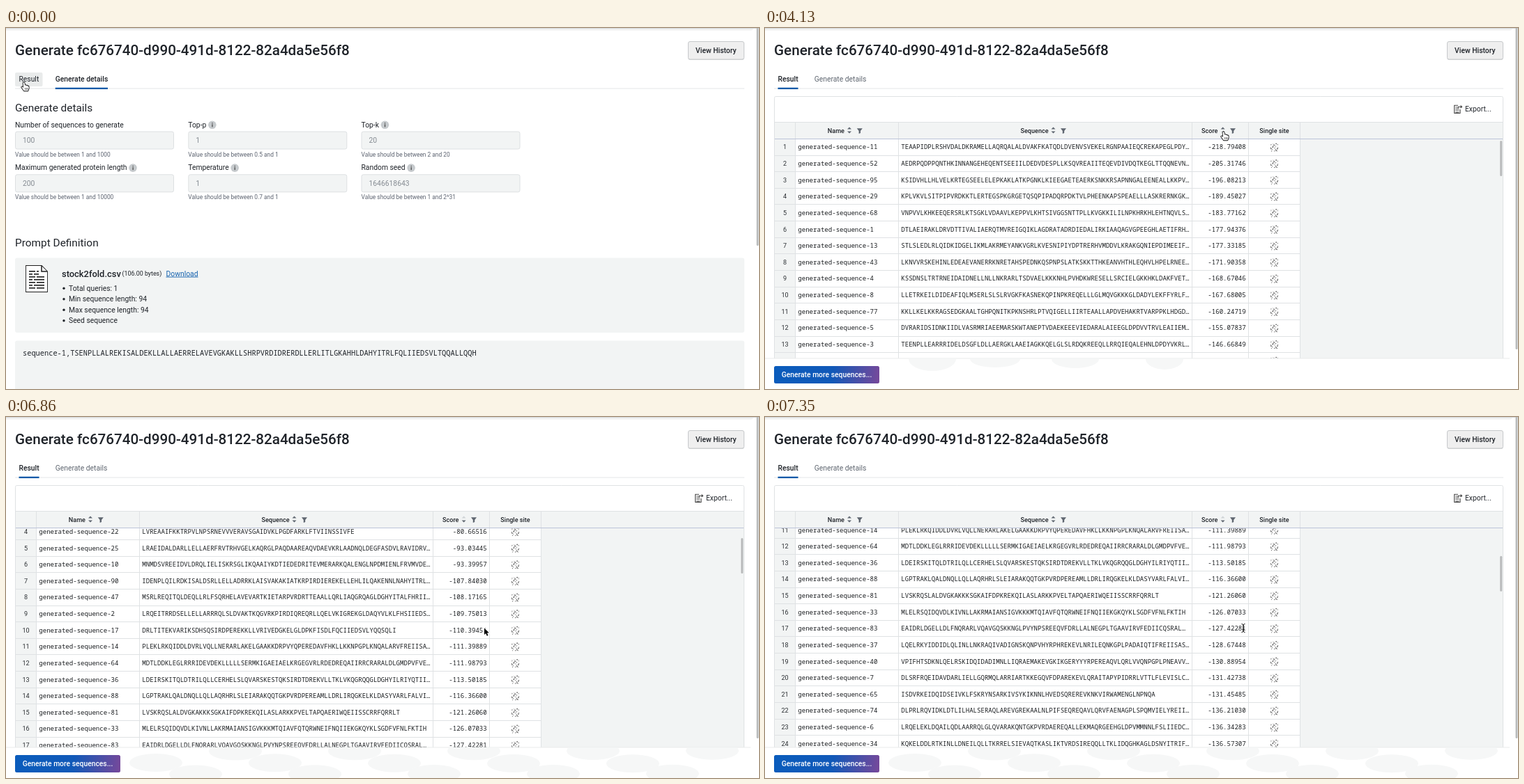
An HTML page with a canvas that plays this animation: 1080 px wide and 519 px high, repeating every 8 s.

```html
<!DOCTYPE html>
<html lang="en">
<head>
<meta charset="utf-8">
<title>Generated sequences</title>
<style>
html, body { margin: 0; width: 100%; height: 100%; overflow: hidden; background: #fff; }
canvas { display: block; width: 1080px; height: 519px; }
</style>
</head>
<body>
<canvas id="stage" width="1080" height="519"></canvas>
<script>
const ctx = document.getElementById('stage').getContext('2d');
const LOOP = 8000, STEP = 70, ROW = 23.63;
const SANS = 'Roboto, "Noto Sans", sans-serif';
const MONO = '"Roboto Mono", "Noto Sans Mono", "DejaVu Sans Mono", monospace';
const INK = '#1f2329', PALE = '#f2f4f4', LINE = '#dfe2e4', BLUE = '#0f5aa8';

// id, score, sequence
const DATA = `1 -177.94376 DTLAEIRAKLDRVDTTIVALIAERQTMVREIGQIKLAGDRATADRDIEDALIRKIAAQAGVGPEEGHLAETIFRH…
2 -109.75013 LRQEITRRDSELLELLARRRQLSLDVAKTKQGVRKPIRDIQREQRLLQELVKIGREKGLDAQYVLKLFHSIIEDS…
3 -146.66849 TEENPLLEARRRIDELDSGFLDLLAERGKLAAEIAGKKQELGLSLRDQKREEQLLRRQIEQALEHNLDPDYVKRL…
4 -168.67046 KSSDNSLTRTRNEIDAIDNELLNLLNKRARLTSDVAELKKKNHLPVHDKWRESELLSRCIELGKKHKLDAKFVET…
5 -155.07837 DVRARIDSIDNKIIDLVASRMRIAEEMARSKWTANEPTVDAEKEEEVIEDARALAIEEGLDPDVVTRVLEAIIEM…
6 -136.34283 LRQELEKLDQAILQDLAARRQLGLQVARAKQNTGKPVRDAEREQALLEKMAQRGEEHGLDPVMMNNLFSLIIEDC…
7 -131.42738 DLSRFRQEIDAVDARLIELLGQRMQLARRIARTKKEGQVFDPAREKEVLQRAITAPYPIDRRLVTTLFLEVISLC…
8 -167.68005 LLETRKEILDIDEAFIQLMSERLSLSLRVGKFKASNEKQPINPKREQELLLGLMQVGKKKGLDADYLEKFFYRLF…
9 -54.33534 KKYRIDGLRKEVDDLDKRILELLGRRMSVVREMAECKRQHGISSFQPHRWREIVETRTEYALAQHLDREFILDML…
10 -93.39957 MNMDSVREEIDVLDRQLIELISKRSGLIKQAAIYKDTIEDEDRITEVMERARKQALENGLNPDMIENLFRVMVDE…
11 -218.79408 TEAAPIDPLRSHVDALDKRAMELLAQRQALALDVAKFKATQDLDVENVSVEKELRGNPAAIEQCREKAPEGLPDY…
12 -138.57103 SKNKLNFLRSKIDNIDQKFLQLLSLRQKLALEIGKNKLKTNSTIFDASREQKLIDKIINLGKEHHLGPSFISLNF
13 -177.33185 STLSLEDLRLQIDKIDGELIKMLAKRMEYANKVGRLKVESNIPIYDPTRERHVMDDVLKRAKGQNIEPDIMEEIF…
14 -111.39889 PLEKLRKQIDDLDVRLVQLLNERARLAKELGAAKKDRPVYQPEREDAVFHKLLKKNPGPLKNQALARVFREIISA…
17 -110.39451 DRLTITEKVARIKSDHSQSIRDPEREKKLLVRIVEDGKELGLDPKFISDLFQCIIEDSVLYQQSQLI
22 -80.66516 LVREAAIFKKTRPVLNPSRNEVVVERAVSGAIDVKLPGDFARKLFTVIINSSIVFE
25 -93.03445 LRAEIDALDARLLELLAERFRVTRHVGELKAQRGLPAQDAAREAQVDAEVKRLAADNQLDEGFASDVLRAVIDRV…
33 -126.07033 MLELRSQIDQVDLKIVNLLAKRMAIANSIGVKKKMTQIAVFQTQRWNEIFNQIIEKGKQYKLSGDFVFNLFKTIH
34 -136.57307 KQKELDDLRTKINLLDNEILQLLTKRRELSIEVAQTKASLIKTVRDSIREQQLLTKLIDQGHKAGLDSNYITRIF…
36 -113.50185 LDEIRSKITQLDTRILQLLCERHELSLQVARSKESTQKSIRDTDREKVLLTKLVKQGRQQGLDGHYILRIYQTII…
37 -128.67448 LQELRKYIDDIDLQLINLLNKRAQIVADIGNSKQNPVHYRPHREKEVLNRILEQNKGPLPADAIQTIFREIISAS…
40 -130.88954 VPIFHTSDKNLQELRSKIDQIDADIMNLLIQRAEMAKEVGKIKGERYYYRPEREAQVLQRLVVQNPGPLPNEAVV…
47 -108.17165 MSRLREQITQLDEQLLRLFSQRHELAVEVARTKIETARPVRDRTTEAALLQRLIAQGRQAGLDGHYITALFHRII…
64 -111.98793 MDTLDDKLEGLRRRIDEVDEKLLLLLSERMKIGAEIAELKRGEGVRLRDEDREQAIIRRCRARALDLGMDPVFVE…
65 -131.45485 ISDVRKEIDQIDSEIVKLFSKRYNSARKIVSYKIKNNLHVEDSQREREVKNKVIRWAMENGLNPNQA
70 -70.11213 DLKEVRRNIDLIDFMILRVLNKRAELALLVGSVKKEITDKKREGEVIERVKRNSFKFHLRPEFIEKLYLEIIRES…
74 -136.21030 DLPRLRQVIDKLDTLILHALSERAQLAREVGREKAALNLPIFSEQREQAVLQRVFAENAGPLSPQMVIELYREII…
75 -15.10172 RKEIDKIDKKIMKLIETRLYHARKLGEYKKKNGIPIIDKKREKEIIRDRVSKSKLSKEFASKLFLLMINESRRVQK
81 -121.26060 LVSKRQSLALDVGKAKKKSGKAIFDPKREKQILASLARKKPVELTAPQAERIWQEIISSCRRFQRRLT
83 -127.42281 EAIDRLDGELLDLFNQRARLVQAVGQSKKNGLPVYNPSREEQVFDRLLALNEGPLTGAAVIRVFEDIICQSRAL…
88 -116.36600 LGPTRAKLQALDNQLLQLLAQRHRLSLEIARAKQQTGKPVRDPEREAMLLDRLIRQGKELKLDASYVARLFALVI…
90 -107.84030 IDENPLQILRDKISALDSRLLELLADRRKLAISVAKAKIATKRPIRDIEREKELLEHLILQAKENNLNAHYITRL…
52 -205.31746
95 -196.08213
29 -189.45027
68 -183.77162
43 -171.90358
77 -160.24719
20 -144.61905`;

let seed = 7;
const rand = () => (seed = (seed * 16807) % 2147483647) / 2147483647;
const randomSeq = () =>
  Array.from({ length: 75 }, () => 'ALERKDIVGQSTNPHLEK'[Math.floor(rand() * 18)]).join('') + '…';

const records = {};
for (const row of DATA.split('\n')) {
  const [id, score, seq] = row.split(' ');
  records[id] = { id, score, seq: seq || randomSeq() };
}
const ORDER = {
  none: [1, 2, 3, 4, 5, 6, 7, 8, 9, 10, 11, 12, 13, 14],
  asc: [11, 52, 95, 29, 68, 1, 13, 43, 4, 8, 77, 5, 3, 20],
  desc: [75, 9, 70, 22, 25, 10, 90, 47, 2, 17, 14, 64, 36, 88, 81, 33, 83, 37, 40, 7, 65, 74, 6, 34]
};

// time, x, y of the pointer hot spot
const PATH = [
  [0, 25.5, 78.5], [280, 28, 76], [1190, 28, 76], [1400, 251.5, 152], [1470, 282, 155],
  [1610, 172, 157], [2030, 172, 157], [2450, 408.5, 185], [2660, 408.5, 185],
  [2870, 648.5, 167], [3220, 648.5, 167], [3290, 657.5, 163.5], [3430, 669, 172],
  [3780, 657.5, 149.5], [5950, 657.5, 149.5], [6160, 686, 303.5]
];
const SCROLL = [[6510, 0], [6580, 4], [6650, 14], [6790, 54], [7070, 147.7], [7210, 201], [7350, 245.2]];

function track(keys, t, i = 1) {
  let a = keys[0];
  for (const b of keys) {
    if (t < b[0]) return a === b ? b[i] : a[i] + (b[i] - a[i]) * (t - a[0]) / (b[0] - a[0]);
    a = b;
  }
  return a[i];
}

// y is the middle of the capitals
function text(s, x, y, size, { weight = 400, color = INK, align = 'left', font = SANS } = {}) {
  ctx.font = `${weight} ${size}px ${font}`;
  ctx.fillStyle = color;
  ctx.textAlign = align;
  ctx.fillText(s, x, y + size * 0.355);
  return ctx.measureText(s).width;
}

function rect(x, y, w, h, fill) {
  ctx.fillStyle = fill;
  ctx.fillRect(x, y, w, h);
}

function box(x, y, w, h, r, fill, stroke) {
  ctx.beginPath();
  ctx.roundRect(x, y, w, h, r);
  if (fill) { ctx.fillStyle = fill; ctx.fill(); }
  if (stroke) { ctx.strokeStyle = stroke; ctx.lineWidth = 1; ctx.stroke(); }
}

function poly(pts, fill, stroke, width = 1, closed = true) {
  ctx.beginPath();
  for (let i = 0; i < pts.length; i += 2) ctx.lineTo(pts[i], pts[i + 1]);
  if (closed) ctx.closePath();
  if (stroke) { ctx.strokeStyle = stroke; ctx.lineWidth = width; ctx.stroke(); }
  if (fill) { ctx.fillStyle = fill; ctx.fill(); }
}

function dot(x, y, r, fill) {
  ctx.beginPath();
  ctx.arc(x, y, r, 0, 7);
  ctx.fillStyle = fill;
  ctx.fill();
}

function at(x, y, draw) {
  ctx.save();
  ctx.translate(x, y);
  draw();
  ctx.restore();
}

function drawTop(t, onResult) {
  box(-10, -10, 1082, 13.5, 4, '#f1f2f2');
  rect(0, 0, 1080, 1, '#d6d8d9');
  text('Generate fc676740-d990-491d-8122-82a4da5e56f8', 13, 32, 20.66, { weight: 500 });
  box(978.5, 20, 80, 26, 2.5, '#d9dbdc');
  box(978.5, 19.5, 80, 25.5, 2.5, '#efefef', '#c6c9cb');
  text('View History', 1018.3, 32.3, 10.33, { weight: 500, align: 'center' });

  rect(13, 86.5, 1046, 1, '#e3e6e8');
  if (t < 1470) box(13, 64, 39.5, 20, 2, t < 490 ? '#e9ebeb' : '#eef0f0');
  const active = { weight: 500 }, idle = { color: '#5f6670' };
  text('Result', 18.5, 73.5, 10.33, onResult ? active : { color: INK });
  text('Generate details', 70.7, 73.5, 10.33, onResult ? idle : active);
  const k = Math.min(1, Math.max(0, (t - 420) / 210));
  const slide = k * k * (3 - 2 * k);
  rect(70.7 - 52.2 * slide, 85.7, 75.3 - 46.3 * slide, 2.3, BLUE);
}

function drawInput(x, y, label, value, hint, info) {
  const w = text(label, x, y, 10.33);
  if (info) {
    dot(x + w + 8.5, y + 0.3, 5.8, '#c6cacd');
    rect(x + w + 8, y - 0.7, 1.2, 4, '#444');
    rect(x + w + 8, y - 2.9, 1.2, 1.3, '#444');
  }
  box(x + 0.5, y + 10, 227, 25, 2.5, PALE, '#dde0e2');
  text(value, x + 11, y + 22.4, 10.33, { color: '#858b92' });
  text(hint, x, y + 42.7, 8.4, { color: '#5c6370' });
}

function drawDetails() {
  text('Generate details', 13, 115, 15.4);
  drawInput(13, 139, 'Number of sequences to generate', '100', 'Value should be between 1 and 1000');
  drawInput(261.3, 139, 'Top-p', '1', 'Value should be between 0.5 and 1', true);
  drawInput(509.5, 139, 'Top-k', '20', 'Value should be between 2 and 20', true);
  drawInput(13, 200.8, 'Maximum generated protein length', '200', 'Value should be between 1 and 10000', true);
  drawInput(261.3, 200.8, 'Temperature', '1', 'Value should be between 0.7 and 1', true);
  drawInput(509.5, 200.8, 'Random seed', '1646618643', 'Value should be between 1 and 2^31', true);

  text('Prompt Definition', 13, 308.5, 15.4);
  box(13, 330.5, 1046, 107.5, 3, PALE);
  at(28, 341, () => {
    poly([1, 1, 23, 1, 31, 9, 31, 38, 1, 38], '#fff', '#1d1d1d', 1.8);
    poly([23, 1, 23, 9, 31, 9], null, '#1d1d1d', 1.5, false);
    for (let i = 0; i < 7; i++) {
      const y = 8 + i * 4, end = i < 2 ? 19 : 27;
      rect(5, y, i % 2 ? 5 : 9, 1.6, '#1d1d1d');
      rect(i % 2 ? 12 : 16, y, end - (i % 2 ? 12 : 16), 1.6, '#1d1d1d');
    }
  });
  text('stock2fold.csv', 80, 353, 12.9, { weight: 500 });
  text('(106.00 bytes)', 166.5, 353, 8.86);
  const w = text('Download', 229.5, 353, 10.33, { color: '#1562ae' });
  rect(229.5, 357.6, w, 0.9, '#1562ae');
  ['Total queries: 1', 'Min sequence length: 94', 'Max sequence length: 94', 'Seed sequence'].forEach((s, i) => {
    dot(83, 374.2 + i * 15.5, 1.7, INK);
    text(s, 90, 374 + i * 15.5, 10.33);
  });
  box(13, 449.5, 1046, 90, 3, PALE);
  text('sequence-1,TSENPLLALREKISALDEKLLALLAERRELAVEVGKAKLLSHRPVRDIDRERDLLERLITLGKAHHLDAHYITRLFQLIIEDSVLTQQALLQQH',
    24, 467.5, 10.33, { font: MONO, weight: 500 });
}

function sortIcon(x, y, state) {
  const dark = '#5f6670', faint = '#cfd3d6';
  poly([x - 3, y - 1.5, x, y - 4.6, x + 3, y - 1.5], state === 'desc' ? faint : dark);
  poly([x - 3, y + 1.5, x, y + 4.6, x + 3, y + 1.5], state === 'asc' ? faint : dark);
}

function filterIcon(x, y) {
  poly([x - 4, y - 3.3, x + 4, y - 3.3, x + 1.2, y + 0.4, x + 1.2, y + 3.4, x - 1.2, y + 4.4, x - 1.2, y + 0.4], '#5f6670');
}

function siteIcon(x, y) {
  for (let i = 0; i < 25; i++) {
    const dx = (i % 5 - 2) * 2.3, dy = (Math.floor(i / 5) - 2) * 2.4;
    dot(x + dx + 0.6 * Math.sin(i * 2.3), y + dy + 0.6 * Math.cos(i * 3.1), 0.6 + 0.25 * Math.sin(i * 4.7), '#5a5a5a');
  }
}

function exportIcon() {
  at(988, 110.5, () => {
    poly([9, 6.5, 9, 12, 0.7, 12, 0.7, 0.7, 6, 0.7], null, '#444', 1.1, false);
    for (let y = 3; y < 11; y += 2.5) rect(2.3, y, 5, 1, '#555');
    poly([6, 4.8, 6.5, 2.8, 11, 2.8], null, '#444', 1.1, false);
    poly([9.6, 0.3, 12.4, 2.8, 9.6, 5.3], '#444');
  });
}

function drawRows(order, scroll) {
  ctx.save();
  ctx.beginPath();
  ctx.rect(13, 160, 1046, 315);
  ctx.clip();
  rect(14, 160, 29, 315, PALE);
  const mono = { font: MONO, weight: 500, color: '#1c1f22' };
  order.forEach((id, i) => {
    const y = 171.2 + i * ROW - scroll;
    if (y < 145 || y > 490) return;
    const { score, seq } = records[id];
    rect(14, Math.round(y + 11.4), 754, 1, LINE);
    text(i + 1, 28.5, y, 9.07, { align: 'center', color: '#2b2f33' });
    text('generated-sequence-' + id, 47.3, y, 9.07, mono);
    text(seq, 195.3, y, 9.07, mono);
    text(score, 689.7, y, 9.07, { ...mono, align: 'right' });
    siteIcon(730.5, y + 0.5);
  });
  ctx.restore();
}

function drawGrid(t, sort, scroll) {
  rect(768, 136, 290, 339, PALE);
  if (t >= 980) drawRows(ORDER[sort], scroll);
  rect(14, 136, 1044, 24, PALE);
  rect(13, 135, 1046, 1, LINE);
  for (const x of [43, 191, 612, 693, 767]) rect(x, 136, 1, 339, LINE);
  rect(13, 159, 1046, 1, '#bcc3d8');
  const head = { weight: 500 };
  text('Name', 89.8, 147.3, 9.07, head);
  text('Sequence', 366.5, 147.3, 9.07, head);
  text('Score', 626, 147.3, 9.07, head);
  text('Single site', 730.5, 147.8, 9.07, { ...head, align: 'center' });
  sortIcon(121, 147, 'none');
  sortIcon(413.5, 147, 'none');
  sortIcon(656.6, 147, sort);
  for (const x of [135.8, 428, 671]) filterIcon(x, 147.5);
  exportIcon();
  text('Export...', 1004, 116.7, 10.33);
  box(13.5, 98.5, 1045, 390, 2, null, LINE);
  box(1054.2, 162 + scroll * 0.154, 3, 51, 1.5, '#b9bbbc');
}

function ellipse(x, y, rx, ry) {
  ctx.beginPath();
  ctx.ellipse(x, y, rx, ry, 0, 0, 7);
  ctx.fill();
}

function drawFooter(t) {
  rect(0, 475, 1075, 44, '#fff');
  rect(0, 474.5, 1068, 1, '#e9ebec');
  ctx.save();
  ctx.beginPath();
  ctx.rect(0, 475.5, 1058, 44);
  ctx.clip();
  ctx.fillStyle = '#f6f7f7';
  if (t < 4970) {
    ellipse(240, 476, 34, 17);
    ellipse(330, 476, 36, 12);
    ellipse(445, 476, 34, 13);
    ellipse(573, 476, 27, 15);
  } else if (t < 6580) {
    for (let i = 0; i < 9; i++) ellipse(228 + i * 42, 475, 30, 9 + 4 * Math.sin(i * 1.7));
  } else {
    for (let i = 0; i < 15; i++) ellipse(215 + i * 57, 497 + 19 * Math.sin(i * 2.1), 38, 13);
  }
  ctx.restore();
  const g = ctx.createLinearGradient(13, 488, 164, 510);
  g.addColorStop(0, '#0a5cbc');
  g.addColorStop(0.55, '#1159b8');
  g.addColorStop(1, '#77489a');
  box(13, 486, 151, 25, 2.5, g);
  text('Generate more sequences...', 88.5, 498.4, 10.33, { weight: 500, color: '#fff', align: 'center' });
}

function pointerKind(t, x, y) {
  if (t >= 6020 && t < 6580 || t >= 6720 && t < 7350) return 'arrow';
  if (y < 90 && x < 52) return 'hand';
  if (y < 160) return x > 640 && y < 157 ? 'hand' : 'arrow';
  return 'beam';
}

function drawArrow() {
  const p = [0, 0, 0, 9.6, 2.2, 7.6, 3.8, 11.2, 5.5, 10.4, 3.9, 7, 6.8, 6.8];
  poly(p, '#000', '#fff', 1.6);
}

function drawBeam() {
  const p = [-2.5, -6, -0.8, -5.6, 0, -4.6, 0, 4.6, -0.8, 5.6, -2.5, 6];
  const mirror = p.map((v, i) => i % 2 ? v : -v);
  for (const [c, w] of [['#fff', 2.4], ['#111', 1]]) {
    poly(p, null, c, w, false);
    poly(mirror, null, c, w, false);
  }
  rect(-1.6, 1.8, 3.2, 0.9, '#111');
}

function drawHand() {
  ctx.lineJoin = 'round';
  poly([-1, 0.3, 0, -0.5, 1.1, 0.4, 1.5, 4, 3, 3.6, 3.7, 4.5, 5.2, 4.2, 5.7, 5.2, 7, 5.2, 7.3, 8, 6, 11.8,
    0.3, 11.8, -1.5, 9.2, -3.4, 6.6, -2.6, 5.8, -0.5, 7.2], '#fff', '#111', 1.7);
  for (const x of [1.6, 3.4, 5.1]) rect(x, 7.6, 0.7, 2.8, '#333');
  ctx.lineJoin = 'miter';
}

const pointers = { arrow: drawArrow, beam: drawBeam, hand: drawHand };

function drawPointer(t) {
  const x = track(PATH, t), y = track(PATH, t, 2);
  const pressed = [[490, 560], [3920, 4060], [4760, 4970]].some(([a, b]) => t >= a && t < b);
  if (pressed) {
    ctx.beginPath();
    ctx.arc(x, y, 22, 0, 7);
    ctx.strokeStyle = 'rgba(0,0,0,.5)';
    ctx.lineWidth = 2;
    ctx.stroke();
  }
  at(x, y, pointers[pointerKind(t, x, y)]);
}

function draw(now) {
  const t = Math.floor((now % LOOP) / STEP) * STEP;
  rect(0, 0, 1080, 519, '#fff');
  drawTop(t, t >= 490);
  if (t < 560) drawDetails();
  else if (t >= 630) {
    drawGrid(t, t < 4060 ? 'none' : t < 4970 ? 'asc' : 'desc', track(SCROLL, t));
    drawFooter(t);
  }
  box(1076.5, -4, 3, t < 560 ? 317 : 466, 1.5, '#b9bbbc');
  drawPointer(t);
}

let start;
function tick(now) {
  start ??= now;
  draw(now - start);
  requestAnimationFrame(tick);
}
draw(0);
requestAnimationFrame(tick);
</script>
</body>
</html>
```
